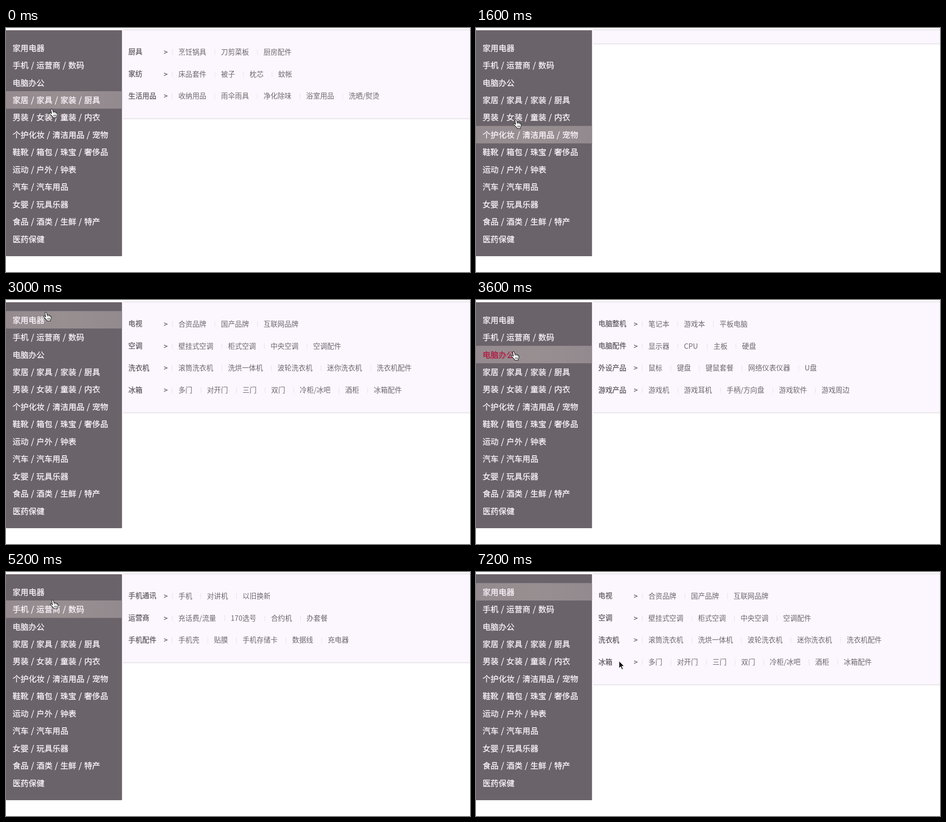
An HTML page for the animation above (8000 ms loop, 1022 by 540 pixels).

```html
<!DOCTYPE html>
<html lang="zh-CN">
<head>
<meta charset="utf-8">
<style>
  html, body { margin: 0; width: 100%; height: 100%; overflow: hidden; background: #fff; }
  svg { display: block; width: 1022px; height: 540px; }
  text { font-family: "Noto Sans CJK SC", "Noto Sans CJK", "Noto Sans", sans-serif; white-space: pre; }
  .menu text { font-size: 17.6px; word-spacing: 1.3px; fill: #fdf5fc; stroke: #fdf5fc; stroke-width: .3; }
  .menu text.hover { fill: #b3163f; stroke: #b3163f; }
  .panel text { font-size: 15.4px; fill: #6d686d; }
  .panel .head { fill: #595459; stroke: #595459; stroke-width: .25; }
  .panel line { stroke: #e6dfe7; }
</style>
</head>
<body>
<svg viewBox="0 0 1022 540">
  <defs>
    <linearGradient id="glow">
      <stop offset="0" stop-color="#958b8f"/>
      <stop offset=".5" stop-color="#988f91"/>
      <stop offset="1" stop-color="#928a8e"/>
    </linearGradient>
  </defs>
  <g class="panel"></g>
  <g class="menu">
    <rect y="5" width="255.5" height="500" fill="#6b636a"/>
    <rect id="bar" width="255.5" height="38.6" fill="url(#glow)"/>
  </g>
  <g id="hand" stroke="#222" stroke-linejoin="round" stroke-linecap="round">
    <path fill="#fff" stroke-width="1.2" d="M-2 1.8Q-2 .2-.5 .2Q1 .2 1.6 2L3 7Q3.5 5.6 5 6Q6.2 6.3 6.4 7.4Q7 6.4 8.4 7Q9.4 7.4 9.5 8.6Q10.6 8 11.2 9.2Q12 10.5 11.5 13Q11.2 15.5 10 17V19.3H2.6L2 17.8Q0 15.5-2 13.5L-5 10.6Q-6 9-4.6 8.4Q-3.4 8.1-1.8 9.6L-.6 10.4Z"/>
    <path fill="none" stroke-width=".9" d="M3 7L3.8 9.6M6.4 7.4L7 9.8M9.5 8.6L9.8 10.6M4 13V16.5M6.2 13V16.5M8.4 13V16.5"/>
  </g>
  <path id="arrow" d="M0 0V16L3.7 12.6L6.4 18.8L9 17.7L6.3 11.6H11.3Z" fill="#111" stroke="#fff" stroke-width="1"/>
</svg>
<script>
const LOOP = 8000, STEP = 200, ROW = 38.45, EM = 15.4;

const categories = [
  "家用电器", "手机 / 运营商 / 数码", "电脑办公", "家居 / 家具 / 家装 / 厨具",
  "男装 / 女装 / 童装 / 内衣", "个护化妆 / 清洁用品 / 宠物", "鞋靴 / 箱包 / 珠宝 / 奢侈品",
  "运动 / 户外 / 钟表", "汽车 / 汽车用品", "女婴 / 玩具乐器",
  "食品 / 酒类 / 生鲜 / 特产", "医药保健"
];

// Each line: heading, then its links
const details = [
  ["电视 合资品牌 国产品牌 互联网品牌",
   "空调 壁挂式空调 柜式空调 中央空调 空调配件",
   "洗衣机 滚筒洗衣机 洗烘一体机 波轮洗衣机 迷你洗衣机 洗衣机配件",
   "冰箱 多门 对开门 三门 双门 冷柜/冰吧 酒柜 冰箱配件"],
  ["手机通讯 手机 对讲机 以旧换新",
   "运营商 充话费/流量 170选号 合约机 办套餐",
   "手机配件 手机壳 贴膜 手机存储卡 数据线 充电器"],
  ["电脑整机 笔记本 游戏本 平板电脑",
   "电脑配件 显示器 CPU 主板 硬盘",
   "外设产品 鼠标 键盘 键鼠套餐 网络仪表仪器 U盘",
   "游戏产品 游戏机 游戏耳机 手柄/方向盘 游戏软件 游戏周边"],
  ["厨具 烹饪锅具 刀剪菜板 厨房配件",
   "家纺 床品套件 被子 枕芯 蚊帐",
   "生活用品 收纳用品 雨伞雨具 净化除味 浴室用品 洗晒/熨烫"]
];

// time, pointer x, pointer y, open category
const path = [
  [0, 101, 179, 3], [200, 103, 203, 4], [400, 102, 230, 5], [800, 98, 246, 5],
  [1400, 91, 226, 5], [1600, 88, 203, 5], [1800, 87, 165, 4], [2000, 87, 130, 3],
  [2200, 87, 92, 2], [2400, 87, 55, 1], [2600, 88, 35, 0], [3000, 88, 27, 0],
  [3200, 86, 68, 1], [3400, 85, 102, 2], [3600, 83, 114, 2], [4000, 84, 112, 2],
  [4200, 86, 90, 1], [4400, 89, 65, 1], [5200, 103, 62, 1], [5400, 108, 50, 0],
  [5600, 150, 46, 0], [5800, 215, 56, 0], [6000, 272, 120, 0], [6200, 300, 170, 0],
  [6600, 318, 192, 0], [7200, 315, 197, 0]
];

const $ = selector => document.querySelector(selector);

function add(parent, tag, attrs, text = "") {
  const node = document.createElementNS("http://www.w3.org/2000/svg", tag);
  for (const key in attrs) node.setAttribute(key, attrs[key]);
  node.textContent = text;
  return parent.appendChild(node);
}

function textWidth(text) {
  const em = c => c === "/" ? .4 : /\d/.test(c) ? .555 : /[A-Z]/.test(c) ? .71 : 1;
  return EM * [...text].reduce((sum, c) => sum + em(c), 0);
}

function buildPanel(lines) {
  const group = add($(".panel"), "g", {});
  const bottom = lines.length ? 54.5 + 48.75 * lines.length : 35;
  add(group, "rect", { x: 257, y: 4, width: 765, height: bottom - 4, fill: "#fcf6fe" });
  for (const y of [4, bottom])
    add(group, "rect", { x: 258, y: y - 1.2, width: 764, height: 2.4, fill: "#ebe6ec" });

  lines.forEach((line, i) => {
    const [head, ...links] = line.split(" ");
    const y = 53 + 48.75 * i;
    add(group, "text", { x: 269.5, y: y + 5.4, class: "head" }, head);
    add(group, "text", { x: 347.5, y: y + 5.8, class: "head" }, ">");
    let x = 379.7;
    for (const link of links) {
      add(group, "line", { x1: x - 13.5, x2: x - 13.5, y1: y - 6, y2: y + 7 });
      add(group, "text", { x, y: y + 5.9 }, link);
      x += textWidth(link) + 32.2;
    }
  });
  return group;
}

const rowCentre = i => 44 + ROW * i;
const labels = categories.map((name, i) =>
  add($(".menu"), "text", { x: 14.5, y: rowCentre(i) + 6.6 }, name));
const panels = categories.map((_, i) => buildPanel(details[i] || []));

function pointerAt(t) {
  const i = path.findLastIndex(p => p[0] <= t);
  const from = path[i], to = path[i + 1] || from;
  const k = to === from ? 0 : (t - from[0]) / (to[0] - from[0]);
  return { x: from[1] + (to[1] - from[1]) * k, y: from[2] + (to[2] - from[2]) * k, open: from[3] };
}

function render(ms) {
  let t = Math.floor(ms % LOOP / STEP) * STEP;
  if (t > 6600 && t < 7200) t = 6600;
  const { x, y, open } = pointerAt(t);

  $("#bar").setAttribute("y", 24.5 + ROW * open);
  panels.forEach((panel, i) => panel.setAttribute("display", i === open ? "inline" : "none"));
  labels.forEach((label, i) => {
    const over = i === open && Math.abs(y - rowCentre(i)) < 9 && x < 14 + label.getComputedTextLength();
    label.classList.toggle("hover", over);
  });

  const inMenu = x < 256;
  for (const [id, shown] of [["#hand", inMenu], ["#arrow", !inMenu]]) {
    $(id).setAttribute("display", shown ? "inline" : "none");
    $(id).setAttribute("transform", `translate(${x} ${y})`);
  }
}

const start = performance.now();
function tick() {
  render(performance.now() - start);
  requestAnimationFrame(tick);
}
tick();
</script>
</body>
</html>
```
